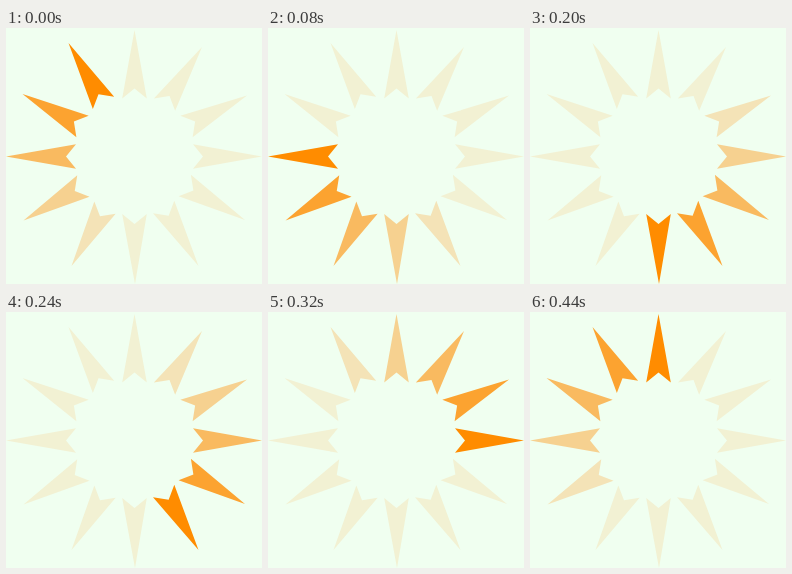
Recreate the animation shown at these times as an HTML page. Size 256 by 256 pixels, loop 0.48 s.

```html
<!DOCTYPE html>
<html lang="en">
<head>
<meta charset="utf-8">
<title>Spinner</title>
<style>
html, body { margin: 0; height: 100%; overflow: hidden; background: #f0fff0; }
svg { display: block; width: 100vw; height: 100vh; }
</style>
</head>
<body>
<svg viewBox="0 0 256 256"><g id="rays" fill="#ff8c00"></g></svg>
<script>
const STEP = 40, COUNT = 12, CENTER = 128.5;
const HALF_WIDTH = 12.3, NOTCH = 10;
const FADE = [1, 0.8, 0.6, 0.4, 0.24];
const REST = 0.12;

// Clockwise from the top: tip x, tip y, base radius
const RAYS = [
  [128.5, 2, 58], [196, 19, 60], [241, 67.5, 60],
  [256, 128.5, 58.5], [239, 192, 58], [192.5, 238, 58.3],
  [129, 256, 57.5], [65.5, 238, 59], [17.5, 192.5, 59],
  [0, 128.5, 58.5], [16.5, 66, 60], [62.5, 15, 62]
];

function polar(angle, along, across) {
  const s = Math.sin(angle), c = Math.cos(angle);
  return [CENTER + s * along + c * across, CENTER - c * along + s * across];
}

const group = document.getElementById('rays');
const rays = RAYS.map(([x, y, base], i) => {
  const angle = i * 2 * Math.PI / COUNT;
  const ray = document.createElementNS('http://www.w3.org/2000/svg', 'polygon');
  ray.setAttribute('points', [
    [x, y],
    polar(angle, base, HALF_WIDTH),
    polar(angle, base + NOTCH, 0),
    polar(angle, base, -HALF_WIDTH)
  ].join(' '));
  return group.appendChild(ray);
});

function draw(time) {
  const head = COUNT - 1 - Math.floor(time / STEP) % COUNT;
  rays.forEach((ray, i) => {
    const lead = (head - i + COUNT) % COUNT;
    ray.setAttribute('opacity', FADE[lead] ?? REST);
  });
}

const start = performance.now();
function tick() {
  draw(performance.now() - start);
  requestAnimationFrame(tick);
}
draw(0);
requestAnimationFrame(tick);
</script>
</body>
</html>
```
